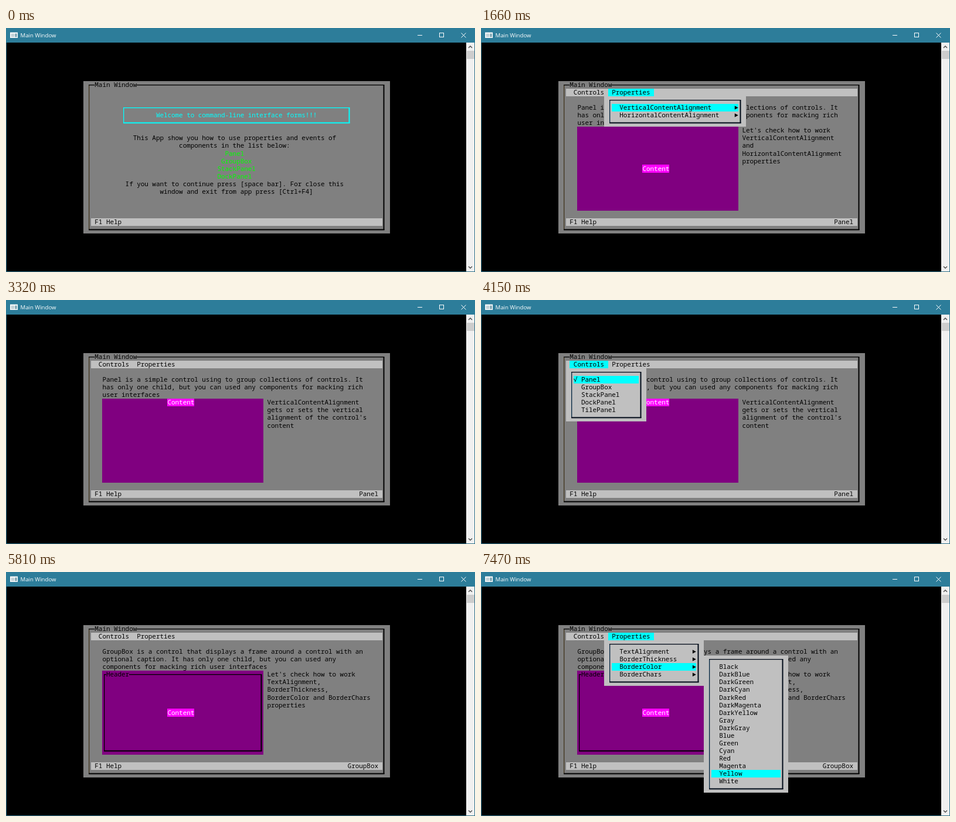
Animation, 800 px wide and 418 px high, one loop 8 s. Source, as an HTML page with a canvas:

```html
<!DOCTYPE html>
<html lang="en">
<head>
<meta charset="utf-8">
<title>Main Window</title>
<style>
  html, body { margin: 0; width: 100%; height: 100%; overflow: hidden; background: #000; }
  canvas { display: block; }
</style>
</head>
<body>
<canvas id="stage" width="800" height="418"></canvas>
<script>
const ctx = document.getElementById('stage').getContext('2d');
const LOOP = 8000, STEP = 830;
const GRAY = '#808080', SILVER = '#c0c0c0', CYAN = '#00ffff', LIME = '#00ff00', PURPLE = '#800080';

// The dialog is laid out on a console character grid.
const X = col => 131.7 + col * 6.536;
const Y = row => 90.8 + row * 13.06;

function rect(x, y, w, h, color) {
  ctx.fillStyle = color;
  ctx.fillRect(x, y, w, h);
}

function cells(col, row, w, h, color) {
  const x = Math.round(X(col)), y = Math.round(Y(row));
  rect(x, y, Math.round(X(col + w)) - x, Math.round(Y(row + h)) - y, color);
}

function text(col, row, str, color = '#000') {
  ctx.fillStyle = color;
  ctx.font = '11px "Noto Sans Mono", monospace';
  [...str].forEach((ch, i) => ctx.fillText(ch, X(col + i), Y(row) + 10.2));
}

function lines(col, row, list, color) {
  list.forEach((str, i) => text(col, row + i, str, color));
}

function stroke(points, color, width = 1) {
  ctx.strokeStyle = color;
  ctx.lineWidth = width;
  ctx.beginPath();
  points.forEach(([x, y]) => ctx.lineTo(x, y));
  ctx.stroke();
}

// Thin left and top edges, double right and bottom edges.
function frame(col, row, w, h, color = '#000', side = color) {
  const l = Math.floor(X(col + .5)), t = Math.floor(Y(row + .5));
  const r = Math.floor(X(col + w - .5)), b = Math.floor(Y(row + h - .5));
  rect(l, t, 1.3, b - t, side);
  rect(l, t, r - l, 1.3, color);
  rect(r - .5, t, 2, b - t + 1, color);
  rect(l, b - .5, r - l + 1.5, 2, color);
}

function popup(col, row, w, items, selected, arrows) {
  const h = items.length + 2;
  cells(col, row, w, h, SILVER);
  frame(col + 1, row, w - 2, h, '#000a18', '#00233f');
  cells(col + 2, row + 1 + selected, w - 4, 1, CYAN);
  lines(col + 4, row + 1, items);
  if (!arrows) return;
  items.forEach((_, i) => {
    const x = X(col + w - 3) + .4, y = Y(row + 1.5 + i);
    ctx.fillStyle = '#000';
    ctx.beginPath();
    ctx.moveTo(x, y - 3.2);
    ctx.lineTo(x + 6, y);
    ctx.lineTo(x, y + 3.2);
    ctx.fill();
  });
}

function windowChrome() {
  rect(0, 0, 800, 418, '#2c6f88');
  rect(0, 0, 800, 25, '#2d7d9a');
  rect(1, 25, 784, 392, '#000');

  rect(7, 7.5, 13, 9.5, '#fff');
  rect(8.5, 9.5, 6, 6, '#c3d2d8');
  rect(15.5, 9.5, 3, 6, '#6f9aa9');
  ctx.fillStyle = '#fff';
  ctx.font = '9.6px "Open Sans", sans-serif';
  ctx.fillText('Main Window', 24.5, 16.3);

  stroke([[702, 12.5], [710, 12.5]], '#fff');
  ctx.strokeRect(739.5, 8.5, 7, 7);
  stroke([[776.5, 8.5], [784.5, 16.5]], '#fff');
  stroke([[784.5, 8.5], [776.5, 16.5]], '#fff');

  rect(785, 25, 14, 392, '#f0f0f0');
  rect(786, 39, 13, 14, '#cdcdcd');
  stroke([[789, 34], [792, 31], [795, 34]], '#505050', 1.5);
  stroke([[789, 408.5], [792, 411.5], [795, 408.5]], '#505050', 1.5);
}

function dialog(status) {
  cells(0, 0, 80, 20, GRAY);
  frame(1, 0, 78, 20, '#000', '#40341c');
  cells(3, 0, 11, 1, GRAY);
  text(3, 0, 'Main Window');
  cells(2, 18, 76, 1, SILVER);
  text(3, 18, 'F1 Help');
  text(77 - status.length, 18, status);
}

function welcome() {
  dialog('');
  frame(10, 3, 60, 3, CYAN);
  text(19, 4, 'Welcome to command-line interface forms!!!', CYAN);
  text(13, 7, 'This App show you how to use properties and events of');
  text(25, 8, 'components in the list below:');
  text(37, 9, 'Panel', LIME);
  text(36, 10, 'GroupBox', LIME);
  lines(35, 11, ['StackPanel', 'DockPanel'], LIME);
  text(11, 13, 'If you want to continue press [space bar]. For close this');
  text(20, 14, 'window and exit from app press [Ctrl+F4]');
}

function page({ name, about, notes, contentRow, header }, menu) {
  dialog(name);
  cells(2, 1, 76, 1, SILVER);
  if (menu === 'Controls') cells(3, 1, 10, 1, CYAN);
  if (menu === 'Properties') cells(13, 1, 12, 1, CYAN);
  text(4, 1, 'Controls');
  text(14, 1, 'Properties');
  lines(5, 3, about);
  lines(48, 6, notes);
  cells(5, 6, 42, 11, PURPLE);
  if (header) {
    frame(5, 6, 42, 11);
    cells(6, 6, header.length, 1, PURPLE);
    text(6, 6, header);
  }
  cells(22, contentRow, 7, 1, '#ff00ff');
  text(22, contentRow, 'Content', '#fff');
}

const panel = {
  name: 'Panel',
  about: ['Panel is a simple control using to group collections of controls. It',
    'has only one child, but you can used any components for macking rich',
    'user interfaces'],
  notes: ["Let's check how to work", 'VerticalContentAlignment', 'and',
    'HorizontalContentAlignment', 'properties'],
  contentRow: 11
};
const panelTop = {
  ...panel,
  notes: ['VerticalContentAlignment', 'gets or sets the vertical',
    "alignment of the control's", 'content'],
  contentRow: 6
};
const groupBox = {
  name: 'GroupBox',
  about: ['GroupBox is a control that displays a frame around a control with an',
    'optional caption. It has only one child, but you can used any',
    'components for macking rich user interfaces'],
  notes: ["Let's check how to work", 'TextAlignment,', 'BorderThickness,',
    'BorderColor and BorderChars', 'properties'],
  contentRow: 11,
  header: 'Header'
};
const colors = ['Black', 'DarkBlue', 'DarkGreen', 'DarkCyan', 'DarkRed', 'DarkMagenta',
  'DarkYellow', 'Gray', 'DarkGray', 'Blue', 'Green', 'Cyan', 'Red', 'Magenta', 'Yellow', 'White'];

function panelProperties() {
  page(panel, 'Properties');
  popup(12, 2, 37, ['VerticalContentAlignment', 'HorizontalContentAlignment'], 0, true);
}

function controlsMenu(selected) {
  page(panelTop, 'Controls');
  popup(2, 2, 21, ['Panel', 'GroupBox', 'StackPanel', 'DockPanel', 'TilePanel'], selected);
  text(4, 3, '√');
}

function groupProperties() {
  page(groupBox, 'Properties');
  popup(12, 2, 26, ['TextAlignment', 'BorderThickness', 'BorderColor', 'BorderChars'], 2, true);
}

const scenes = [
  welcome,
  () => page(panel),
  panelProperties,
  () => { panelProperties(); popup(49, 2, 17, ['Top', 'Center', 'Bottom'], 0); },
  () => page(panelTop),
  () => controlsMenu(0),
  () => controlsMenu(1),
  () => page(groupBox),
  groupProperties,
  () => { groupProperties(); popup(38, 4, 22, colors, 14); }
];

function draw() {
  windowChrome();
  scenes[Math.floor(performance.now() % LOOP / STEP)]();
  requestAnimationFrame(draw);
}
draw();
</script>
</body>
</html>
```
